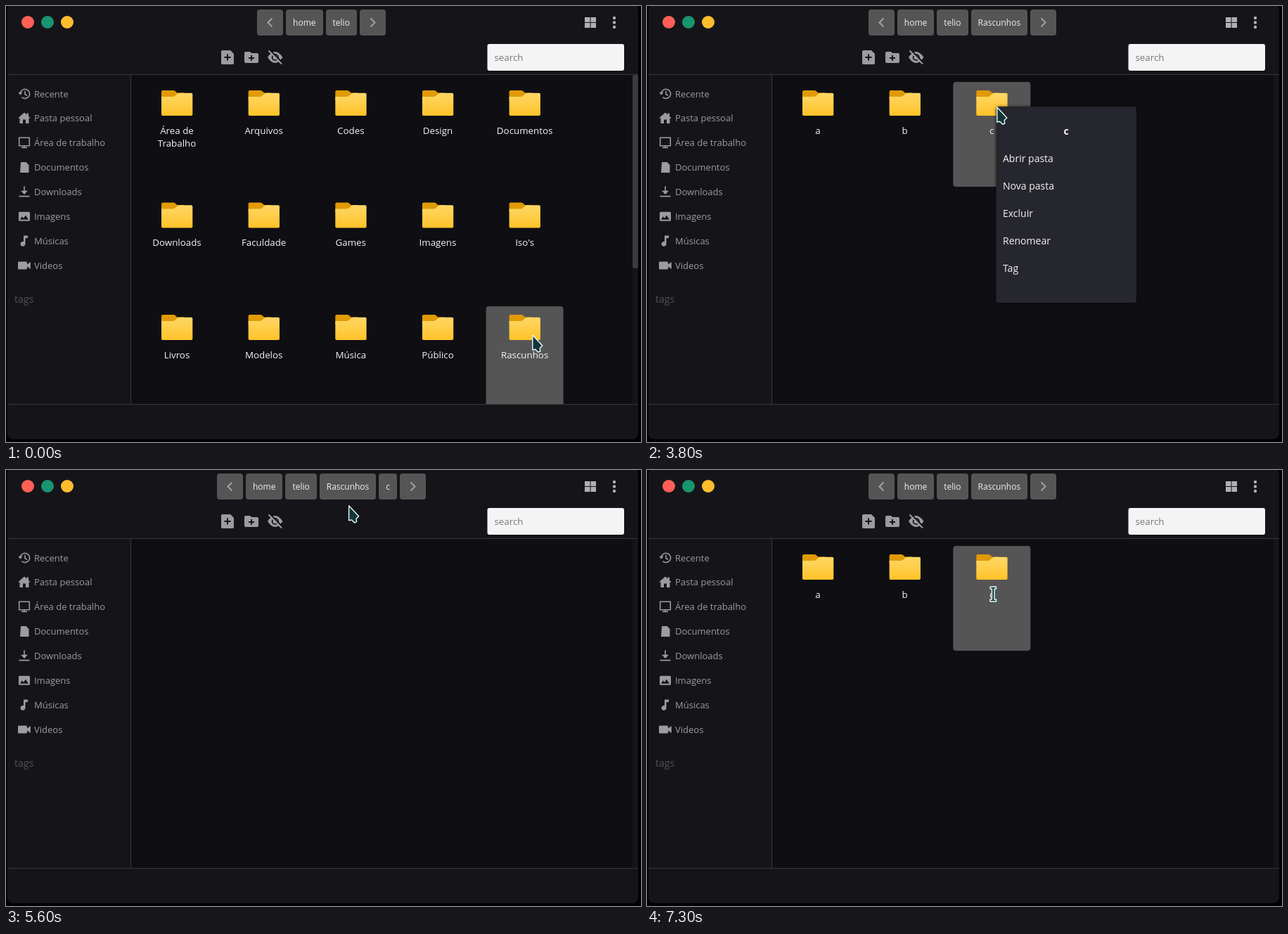
Animation of 903 by 620 pixels, one loop 8000 ms. Source, as an HTML page:

```html
<!DOCTYPE html>
<html lang="pt">
<head>
<meta charset="utf-8">
<style>
html, body { margin: 0; width: 100%; height: 100%; overflow: hidden; background: #000; }
svg { position: absolute; left: 0; top: 0; }
svg, #crumbs { font-family: "Open Sans", sans-serif; }
#crumbs { position: absolute; left: 0; top: 5px; width: 897px; display: flex; justify-content: center; gap: 4px; }
#crumbs span { height: 37px; padding: 0 10px; border-radius: 4px; background: #555; color: #f0f0f0; font-size: 12px; line-height: 37px; }
#crumbs .arrow { width: 37px; padding: 0; }
#crumbs svg { position: static; display: block; }
.side { font-size: 13px; fill: #9c9c9e; }
.label { font-size: 13.33px; fill: #f4f4f4; text-anchor: middle; }
.menu { font-size: 14px; fill: #f4f4f4; }
.fill { fill: #9c9c9e; }
.line { fill: none; stroke: #9c9c9e; stroke-width: 1.6; }
</style>
</head>
<body>
<svg id="stage" width="903" height="620">
  <defs>
    <linearGradient id="gold" x2="0" y2="1">
      <stop stop-color="#ffd767"/><stop offset="1" stop-color="#ffc328"/>
    </linearGradient>
    <g id="folder">
      <path fill="#e19a04" d="M-22 2q0-2 2-2h15q1.500 0 2.500 1l3 2.500h10v10h-32.500z"/>
      <path fill="url(#gold)" d="M-22 9h16q2 0 3.500-1.300l3-2.700q1.500-1.300 3.500-1.300h16.500q1.800 0 1.800 1.800v28.700q0 1.800-1.800 1.800h-40.700q-1.800 0-1.800-1.800z"/>
    </g>
    <clipPath id="pane"><path d="M178 98h713v468h-713z"/></clipPath>
    <filter id="shade" x="-10%" y="-10%" width="120%" height="120%">
      <feDropShadow dx="0" dy="0" stdDeviation="2" flood-opacity=".6"/>
    </filter>
  </defs>
  <rect x="2" y="-3" width="897" height="619" rx="8" fill="#151519"/>
  <path fill="#0f0f13" d="M178 98h713v468h-713z"/>
  <path stroke="#37373a" d="M2 97.500h897M2 566.500h897M177.500 98v468"/>
  <circle cx="31" cy="23" r="9" fill="#ff5f57"/>
  <circle cx="59" cy="23" r="9" fill="#1a936f"/>
  <circle cx="87" cy="23" r="9" fill="#ffbd2e"/>
  <path fill="#b0b0b2" d="M823 16h7.500v7h-7.500zm8.500 0h7.500v7h-7.500zm-8.500 8h7.500v7h-7.500zm8.500 0h7.500v7h-7.500z"/>
  <path stroke="#b0b0b2" stroke-width="4.400" stroke-linecap="round" d="M865 17v0M865 23.500v0M865 30v0"/>
  <g class="fill">
    <path d="M308 63h11l5 5v13q0 2-2 2h-14q-2 0-2-2v-16q0-2 2-2z"/>
    <path d="M341 65h6l2 2h8q2 0 2 2v10q0 2-2 2h-16q-2 0-2-2v-12q0-2 2-2z"/>
    <path d="M372 73q10.500-16 21.500 0q-11 16-21.500 0z"/>
  </g>
  <path fill="none" stroke="#151519" stroke-width="2" d="M315 68.500v9M310.500 73h9M349 70v8M345 74h8"/>
  <circle cx="382.800" cy="73" r="4.200" fill="#9c9c9e" stroke="#151519" stroke-width="1.800"/>
  <path stroke="#151519" stroke-width="2.200" d="M375 62.500L393.500 81"/>
  <path stroke="#9c9c9e" stroke-width="2" d="M373.500 63.500L392 82.500"/>
  <rect x="684.500" y="54" width="194.500" height="38" rx="3" fill="#f4f4f4"/>
  <text x="694.500" y="77.500" font-size="13.330" fill="#777">search</text>
  <g id="sidebar"></g>
  <text x="12" y="421.500" font-size="14" fill="#525255">tags</text>
  <rect id="thumb" x="891" y="98" width="8" height="275" rx="3" fill="#3b3b3f"/>
  <g id="files" clip-path="url(#pane)"></g>
  <g id="menu" class="menu">
    <rect x="496.500" y="143" width="199.500" height="279" rx="4" fill="#25252d" filter="url(#shade)"/>
    <text x="596" y="183" font-weight="700" text-anchor="middle">c</text>
  </g>
</svg>
<div id="crumbs"></div>
<svg width="903" height="620">
  <g id="cursor" fill="#12363a" stroke="#e6fbfb" stroke-width="1.400" stroke-linejoin="round">
    <path id="arrow" d="M.8 1V22L4.800 21.200L8.800 25.200L11.800 24L11.200 19.500L14.800 16z"/>
    <path id="beam" d="M-4-10H4.500V-7H2V8H4.500V11H-4V8H-1.500V-7H-4z"/>
  </g>
</svg>
<script>
const $ = id => document.getElementById(id);

// sidebar rows: name, filled path, stroked path, drawn around the row's icon centre
const places = [
  ['Recente', 'M-8.500-2h6l-3.500 4z', 'M-5.500-1A6.600 6.600 0 1 1-3.500 5M1-4V.8L4 2.600'],
  ['Pasta pessoal', 'M0-8L3.500-5V-7H6V-2.500L9 0H6.500V7.500H2V2H-2V7.500H-6.500V0H-9z', ''],
  ['Área de trabalho', 'M-4 6h8v1.700h-8z', 'M-7.300-7.200H7.300V4.300H-7.300zM0 4V7'],
  ['Documentos', 'M-5-7.500H2.500L6.500-3.500V7.500H-6z', ''],
  ['Downloads', 'M-5-1.500H5L0 3.800zM-7.500 5.500h15v1.800h-15z', 'M0-8V0'],
  ['Imagens', 'M-6.500-6.500H6.500Q8-6.500 8-5V5Q8 6.500 6.500 6.500H-6.500Q-8 6.500-8 5V-5Q-8-6.500-6.500-6.500zM-6 4.500H6L2-1.500L-1.200 2.500L-3.300 0z', ''],
  ['Músicas', 'M-1-7.500H5V-4H1.500V4A3.500 3.500 0 1 1-1 .9z', ''],
  ['Videos', 'M-8-5.500H2.500Q4-5.500 4-4V-1.500L8.800-5V5L4 1.500V4Q4 5.500 2.500 5.500H-8Q-9 5.500-9 4V-4Q-9-5.500-8-5.500z', '']
];
$('sidebar').innerHTML = places.map(([name, fill, line], i) => {
  const y = 124.700 + i * 34.900;
  return `<g transform="translate(26 ${y})"><path class="fill" fill-rule="evenodd" d="${fill}"/>
    <path class="line" d="${line}"/></g><text class="side" x="40" y="${y + 4.800}">${name}</text>`;
}).join('');

['Abrir pasta', 'Nova pasta', 'Excluir', 'Renomear', 'Tag'].forEach((name, i) => {
  $('menu').innerHTML += `<text x="506" y="${222 + i * 39}">${name}</text>`;
});

const home = ['home', 'telio'];
const drafts = [...home, 'Rascunhos'];
const views = {
  home: {
    path: home,
    files: ['Área de|Trabalho', 'Arquivos', 'Codes', 'Design', 'Documentos', 'Downloads', 'Faculdade',
      'Games', 'Imagens', "Iso's", 'Livros', 'Modelos', 'Música', 'Público', 'Rascunhos']
  },
  drafts: { path: drafts, files: ['a', 'b', 'c'] },
  empty: { path: [...drafts, 'c'], files: [] }
};

const cell = i => ({ x: 243 + i % 5 * 123.650, y: 108 + Math.floor(i / 5) * 159.500 });
const inside = (i, p) => {
  const c = cell(i);
  return Math.abs(p.x - c.x) < 55 && p.y > c.y && p.y < c.y + 149;
};

function drawFile(name, i, hot) {
  const { x, y } = cell(i);
  const box = hot ? `<rect x="${x - 55}" y="${y}" width="110" height="149" rx="4" fill="#555"/>` : '';
  const lines = name.split('|').map((s, n) =>
    `<text class="label" x="${x}" y="${y + 73.500 + n * 18}">${s}</text>`).join('');
  return `${box}<use href="#folder" x="${x}" y="${y + 12}"/>${lines}`;
}

const chevron = dir => `<span class="arrow"><svg width="37" height="37">
  <path d="M${18.500 + dir * -3} 12.500l${dir * 6} 6l${dir * -6} 6" fill="none" stroke="#a2a2a2" stroke-width="2"/></svg></span>`;

// start time, number of 100 ms steps, end point
const moves = [
  [1700, 5, 497, 143], [4000, 5, 579, 210], [4600, 1, 580, 211],
  [5300, 5, 476, 31], [5900, 1, 477, 30], [6500, 9, 492, 176]
];
function pointer(t) {
  const p = { x: 748, y: 467 };
  for (const [start, steps, x, y] of moves) {
    const k = Math.min(steps, Math.max(0, Math.floor((t - start) / 100) + 1)) / steps;
    const e = k * k * (3 - 2 * k);
    p.x += (x - p.x) * e;
    p.y += (y - p.y) * e;
  }
  return p;
}

let shown;
function frame() {
  const t = performance.now() % 8000;
  const p = pointer(t);
  const name = t < 1200 ? 'home' : t >= 4800 && t < 6200 ? 'empty' : 'drafts';
  const view = views[name];
  const menu = t >= 3800 && t < 4800;
  const hot = menu ? 2 : view.files.findIndex((_, i) => inside(i, p));
  const key = name + hot;
  if (key !== shown) {
    shown = key;
    $('files').innerHTML = view.files.map((f, i) => drawFile(f, i, i === hot)).join('');
    $('crumbs').innerHTML = chevron(-1) + view.path.map(s => `<span>${s}</span>`).join('') + chevron(1);
  }
  const show = (id, on) => $(id).setAttribute('visibility', on ? 'visible' : 'hidden');
  const beam = name === 'drafts' && hot === 2 && !menu && p.y > 168;
  show('thumb', name === 'home');
  show('menu', menu);
  show('beam', beam);
  show('arrow', !beam);
  $('cursor').setAttribute('transform', `translate(${p.x} ${p.y})`);
  requestAnimationFrame(frame);
}
frame();
</script>
</body>
</html>
```
